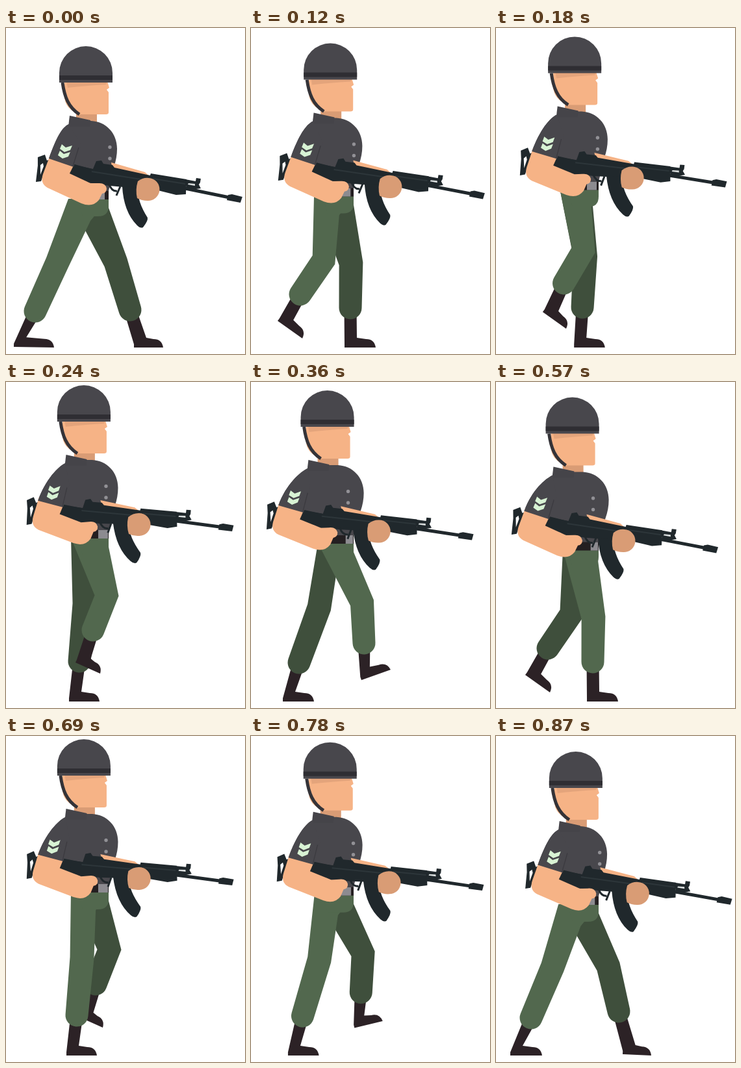
Write an HTML page that moves like this. It is 368x502 px and loops after 900 ms.

```html
<!DOCTYPE html>
<html lang="en">
<head>
<meta charset="utf-8">
<title>Marching soldier</title>
<style>
html, body { margin: 0; width: 100%; height: 100%; overflow: hidden; background: #fff; }
svg { display: block; width: 100vw; height: 100vh; }
.cloth { fill: #48474c; }
.band { fill: #2f2e33; }
.skin { fill: #f6b386; }
.shade { fill: #d99c75; }
.gun { fill: #20282c; }
.boot { fill: #2c2226; }
.near { fill: #52684e; }
.far { fill: #3f4f3c; }
</style>
</head>
<body>
<svg viewBox="0 0 368 502">
  <path id="farBoot" class="boot"/>
  <path id="farLeg" class="far"/>
  <path id="nearBoot" class="boot"/>
  <path id="nearLeg" class="near"/>
  <g id="hips">
    <path class="near" d="M110 263H158V274Q158 290 142 290H118Z"/>
    <rect x="110" y="250" width="48" height="14" fill="#241f21"/>
    <rect id="buckle" y="251" height="13" fill="#8c8b90"/>
  </g>
  <g id="head">
    <path class="shade" d="M108 128H140V148H108Z"/>
    <path class="skin" d="M90 82H156L159 92L155 95L158 99V130Q158 133 154 133H114Q90 125 90 104Z"/>
    <path class="shade" d="M93 82H156L154 87Q122 89 95 92Z" opacity=".6"/>
    <path d="M87 84C90 106 96 122 113 133" fill="none" stroke="#343338" stroke-width="5"/>
    <path class="cloth" d="M82 84V69A41 41 0 0 1 164 69V84Z"/>
    <path class="band" d="M82 73H164V80H82Z"/>
  </g>
  <path id="torso" class="cloth"/>
  <path id="collar" fill="#454449"/>
  <g id="buttons" fill="#929196"><circle cx="160" cy="183.500" r="2.700"/><circle cx="160" cy="201" r="2.700"/></g>
  <g id="arms">
    <path class="skin" d="M162 207L214 222L224 231L206 236L164 218Z"/>
    <path class="gun" fill-rule="evenodd" d="M49 199L60 195L63 204L72 201L132 217L130 238L62 215L54 236L46 237L49 212ZM53 211L57 208L58 213L53 226Z"/>
    <path class="gun" d="M104 211L134 217L139 205L147 204L150 209L164 211L167 215L222 227L223 224L278 233L277 256L262 257L226 248L203 247L160 243L126 238Z"/>
    <path d="M132 221L220 235M226 232L276 240" stroke="#2d363a" stroke-width="2"/>
    <path class="gun" d="M276 233L292 236L293 231L300 232L299 238L297 241L300 247L278 250Z"/>
    <path d="M281 239L291 240L291 243L280 241Z" fill="#d9dddd"/>
    <path d="M276 247L344 261" stroke="#20282c" stroke-width="5"/>
    <path class="gun" d="M342 257L348 256L364 260L361 269L340 265Z"/>
    <path class="gun" d="M179 243L203 246Q202 267 218 292Q219 297 211 307Q207 309 202 304Q181 283 179 243Z"/>
    <path d="M159 241Q163 252 171 251M176 244L170 258" fill="none" stroke="#20282c" stroke-width="3"/>
    <path class="shade" d="M203 236Q211 230 220 231A17.500 17.500 0 0 1 218 266Q209 266 202 262Q199 249 203 236Z"/>
    <path class="skin" d="M68 196L57 225Q52 239 64 246L116 270Q133 277 143 265L148 255Q155 254 155 247Q153 238 142 239L130 239L98 224L105 210Z"/>
  </g>
  <path id="sleeve" class="cloth"/>
  <g id="badge">
    <path d="M112 184L103 213" stroke="#3b3a3f" stroke-width="1.200"/>
    <path d="M86 179L92 184L102 181L99 188L90 191L83 186ZM83 189L89 194L99 191L96 198L87 201L80 196Z" fill="#d8f3d4"/>
  </g>
</svg>
<script>
const LOOP = 900, STEP = 30;
const $ = id => document.getElementById(id);
const set = (id, name, value) => $(id).setAttribute(name, value);
const move = (id, x, y) => set(id, 'transform', `translate(${x} ${y})`);
const pts = list => list.map(p => p.map(v => v.toFixed(2)).join(' '));

// time, body lift, grip height, arm angle; repeats every half loop
const BODY = [
  [0, 0, 248.5, 0],
  [120, -4.5, 244.5, -.65],
  [240, -23, 219.5, -4],
  [360, -15, 230, -2.8],
  [420, -4, 242.5, -1.3]
];

// time, then x and y of knee, ankle, heel and toe
const LEG = [
  [0, 79, 361, 45, 436, 12, 491, 74, 492],
  [120, 112, 357, 76, 410, 41, 451, 79, 478],
  [240, 155, 329, 134, 382, 107, 432, 145, 449],
  [360, 171, 340, 174, 402, 170, 459, 215, 443],
  [420, 169, 355, 185, 424, 191, 490, 235, 492],
  [450, 165, 361, 187, 434, 193, 492, 238, 492],
  [570, 150, 363, 149, 431, 140, 492, 188, 492],
  [690, 117, 342, 109, 430, 93, 492, 140, 492],
  [810, 101, 347, 70, 432, 45, 492, 93, 492],
  [870, 87, 356, 54, 434, 22, 492, 71, 492]
];

// Smooth periodic curve through the keys
function sample(keys, period, time) {
  const n = keys.length, t = time % period;
  const key = i => {
    const turn = Math.floor(i / n), k = keys[i - turn * n];
    return [k[0] + turn * period, ...k.slice(1)];
  };
  let i = n - 1;
  while (keys[i][0] > t) i--;
  const [a, b, c, d] = [key(i - 1), key(i), key(i + 1), key(i + 2)];
  const h = c[0] - b[0], u = (t - b[0]) / h;
  return b.slice(1).map((p, j) => {
    const q = c[j + 1];
    const m = (q - a[j + 1]) / (c[0] - a[0]) * h;
    const w = (d[j + 1] - p) / (d[0] - b[0]) * h;
    return p + u * m + u * u * (3 * (q - p) - 2 * m - w) + u * u * u * (2 * (p - q) + m + w);
  });
}

function unit(a, b) {
  const x = b[0] - a[0], y = b[1] - a[1], l = Math.hypot(x, y) || 1;
  return [x / l, y / l];
}

// Point offset to the right-hand side (seen on a hanging leg)
const side = (p, d, w) => [p[0] + d[1] * w, p[1] - d[0] * w];

function drawLeg(name, time, dx, lift, left) {
  const v = sample(LEG, LOOP, time);
  const [knee, ankle, heel, toe] = [0, 2, 4, 6].map(i => [v[i] + dx, Math.min(v[i + 1], 492)]);
  const top = 263 + lift;
  const thigh = unit([126, top], knee), calf = unit(knee, ankle);
  const bend = unit([0, 0], [thigh[0] + calf[0], thigh[1] + calf[1]]);
  const kl = side(knee, bend, -18.5), kr = side(knee, bend, 18.5);
  const al = side(ankle, calf, -17.5), ar = side(ankle, calf, 17.5);
  const s = Math.max(0, Math.min(1, (kr[0] - 95) / 75)) ** 2;
  const p = pts([[left, top], kl, al, ar, kr, [130 + 28 * s, top + 34 - 20 * s], [158, top]]);
  set(name + 'Leg', 'd', `M${p[0]}L${p[1]}L${p[2]}A17.5 17.5 0 0 0 ${p[3]}L${p[4]}L${p[5]}L${p[6]}Z`);

  const u = unit(heel, toe), size = Math.hypot(toe[0] - heel[0], toe[1] - heel[1]);
  const at = (x, y) => [heel[0] + u[0] * x + u[1] * y, heel[1] + u[1] * x - u[0] * y];
  const shin = unit(ankle, at(9, 8));
  const b = pts([heel, toe, at(size - 2, 13), at(size - 15, 13), at(19, 15),
    side(ankle, shin, 9.5), side(ankle, shin, -9.5), at(0, 5)]);
  set(name + 'Boot', 'd', `M${b[0]}L${b[1]}Q${b[2]} ${b[3]}L${b[4]}L${b[5]}L${b[6]}L${b[7]}Z`);
}

function draw(t) {
  const a = t / LOOP * 2 * Math.PI;
  const sway = Math.cos(a - .1);
  const [lift, gripY, tilt] = sample(BODY, LOOP / 2, t);
  const gripX = 205 + 12.1 * sway + .9 * Math.cos(2 * a);
  const hip = 100 - 4 * sway;

  drawLeg('far', t + LOOP / 2, 4, lift, hip);
  drawLeg('near', t, 0, lift, hip);

  move('hips', 0, lift);
  const bx = 142 - 5 * sway;
  set('buckle', 'x', bx);
  set('buckle', 'width', Math.min(15, 157 - bx));
  move('head', 3.1 * (sway - 1), lift);
  move('buttons', 6 * (sway - 1), lift);

  const arm = `translate(${gripX} ${gripY}) rotate(${tilt}) translate(-218 -248.5)`;
  set('arms', 'transform', arm);
  set('badge', 'transform', arm);

  const r = tilt * Math.PI / 180, cos = Math.cos(r), sin = Math.sin(r);
  const held = (x, y) => [
    gripX + (x - 218) * cos - (y - 248.5) * sin,
    gripY + (x - 218) * sin + (y - 248.5) * cos
  ];
  const cx = 92.5 + 5.5 * sway, chest = 172.5 - 1.5 * sway;
  const y = v => v + lift;
  const cuff = held(66, 201), inner = held(104, 214), pit = held(116, 180);
  const curve = `M${cx - 1} ${y(148)}C${cx - 12} ${y(153)} ${cuff[0] + 12} ${cuff[1] - 33} ${cuff}`;
  set('sleeve', 'd', `${curve}L${inner}L${pit}Z`);
  set('torso', 'd', `${curve}L${inner}L112 ${y(251)}H158L${chest - 5} ${y(214)}` +
    `Q${chest} ${y(200)} ${chest} ${y(186)}C${chest} ${y(162)} ${chest - 17} ${y(144)} ${chest - 40} ${y(143)}L${cx + 20} ${y(143)}Z`);
  set('collar', 'd', `M${cx} ${y(135)}L${cx + 32} ${y(142)}L${cx + 31} ${y(152)}L${cx - 2} ${y(152)}Z`);
}

function tick(now) {
  draw(Math.floor(now % LOOP / STEP) * STEP);
  requestAnimationFrame(tick);
}
draw(0);
requestAnimationFrame(tick);
</script>
</body>
</html>
```
